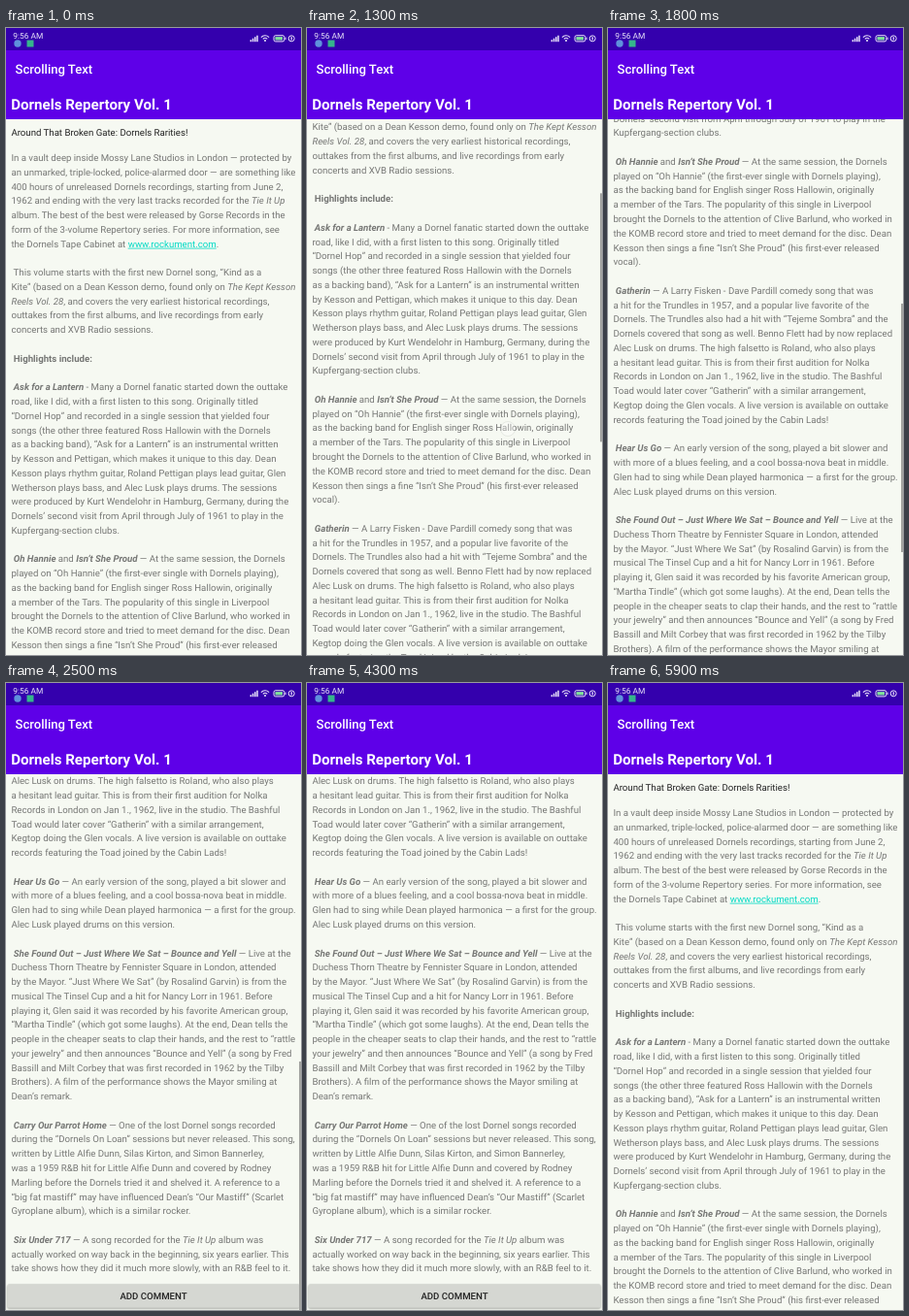
Recreate the animation shown at these times as an HTML page with a canvas. Size 304 px wide and 646 px high, loop 9 s.

```html
<!DOCTYPE html>
<html lang="en">
<head>
<meta charset="utf-8">
<title>Scrolling Text</title>
<style>
html, body { margin: 0; width: 100%; height: 100%; overflow: hidden; background: #f6f9f2; }
canvas { display: block; width: 304px; height: 646px; }
</style>
</head>
<body>
<canvas id="stage"></canvas>
<script>
const W = 304, H = 646, LOOP = 9000, STEP = 100;
const TOP = 94, MAX_SCROLL = 638, LEFT = 5.4;
const LINE = 14.765, FIRST = 137, SIZE = 9.64;
const FAMILY = 'Roboto, sans-serif';
const PAPER = '#f6f9f2', GREY = '#767775', INK = '#222', TEAL = '#03dac5';

// Marks: *bold italic*  _italic_  #bold#  ~link~
const article = `In a vault deep inside Mossy Lane Studios in London — protected by
an unmarked, triple-locked, police-alarmed door — are something like
400 hours of unreleased Dornels recordings, starting from June 2,
1962 and ending with the very last tracks recorded for the _Tie It Up_
album. The best of the best were released by Gorse Records in the
form of the 3-volume Repertory series. For more information, see
the Dornels Tape Cabinet at ~www.rockument.com~.

 This volume starts with the first new Dornel song, “Kind as a
Kite” (based on a Dean Kesson demo, found only on _The Kept Kesson_
_Reels Vol. 28_, and covers the very earliest historical recordings,
outtakes from the first albums, and live recordings from early
concerts and XVB Radio sessions.

# Highlights include:#

 *Ask for a Lantern* - Many a Dornel fanatic started down the outtake
road, like I did, with a first listen to this song. Originally titled
“Dornel Hop” and recorded in a single session that yielded four
songs (the other three featured Ross Hallowin with the Dornels
as a backing band), “Ask for a Lantern” is an instrumental written
by Kesson and Pettigan, which makes it unique to this day. Dean
Kesson plays rhythm guitar, Roland Pettigan plays lead guitar, Glen
Wetherson plays bass, and Alec Lusk plays drums. The sessions
were produced by Kurt Wendelohr in Hamburg, Germany, during the
Dornels’ second visit from April through July of 1961 to play in the
Kupfergang-section clubs.

 *Oh Hannie* and *Isn’t She Proud* — At the same session, the Dornels
played on “Oh Hannie” (the first-ever single with Dornels playing),
as the backing band for English singer Ross Hallowin, originally
a member of the Tars. The popularity of this single in Liverpool
brought the Dornels to the attention of Clive Barlund, who worked in
the KOMB record store and tried to meet demand for the disc. Dean
Kesson then sings a fine “Isn’t She Proud” (his first-ever released
vocal).

 *Gatherin* — A Larry Fisken - Dave Pardill comedy song that was
a hit for the Trundles in 1957, and a popular live favorite of the
Dornels. The Trundles also had a hit with “Tejeme Sombra” and the
Dornels covered that song as well. Benno Flett had by now replaced
Alec Lusk on drums. The high falsetto is Roland, who also plays
a hesitant lead guitar. This is from their first audition for Nolka
Records in London on Jan 1., 1962, live in the studio. The Bashful
Toad would later cover “Gatherin” with a similar arrangement,
Kegtop doing the Glen vocals. A live version is available on outtake
records featuring the Toad joined by the Cabin Lads!

 *Hear Us Go* — An early version of the song, played a bit slower and
with more of a blues feeling, and a cool bossa-nova beat in middle.
Glen had to sing while Dean played harmonica — a first for the group.
Alec Lusk played drums on this version.

 *She Found Out – Just Where We Sat – Bounce and Yell* — Live at the
Duchess Thorn Theatre by Fennister Square in London, attended
by the Mayor. “Just Where We Sat” (by Rosalind Garvin) is from the
musical The Tinsel Cup and a hit for Nancy Lorr in 1961. Before
playing it, Glen said it was recorded by his favorite American group,
“Martha Tindle” (which got some laughs). At the end, Dean tells the
people in the cheaper seats to clap their hands, and the rest to “rattle
your jewelry” and then announces “Bounce and Yell” (a song by Fred
Bassill and Milt Corbey that was first recorded in 1962 by the Tilby
Brothers). A film of the performance shows the Mayor smiling at
Dean’s remark.

 *Carry Our Parrot Home* — One of the lost Dornel songs recorded
during the “Dornels On Loan” sessions but never released. This song,
written by Little Alfie Dunn, Silas Kirton, and Simon Bannerley,
was a 1959 R&B hit for Little Alfie Dunn and covered by Rodney
Marling before the Dornels tried it and shelved it. A reference to a
“big fat mastiff” may have influenced Dean’s “Our Mastiff” (Scarlet
Gyroplane album), which is a similar rocker.

 *Six Under 717* — A song recorded for the _Tie It Up_ album was
actually worked on way back in the beginning, six years earlier. This
take shows how they did it much more slowly, with an R&B feel to it.`.split('\n');

const fonts = { '*': 'italic 700', '_': 'italic 400', '#': '700', '~': '400', '': '400' };

// Keyframes as [time, value] pairs
const scrollKeys = [[1000, 0], [1100, 22], [1200, 92], [1300, 164.5], [1500, 255],
  [1800, 409.5], [2000, 560], [2100, 616], [2200, 634], [2300, MAX_SCROLL],
  [4400, MAX_SCROLL], [4500, 618], [4700, 500], [5000, 259.5], [5200, 105],
  [5300, 45], [5400, 12], [5500, 0]];
const barKeys = [[1000, 0], [1100, 1], [2500, 1], [2800, 0],
  [4400, 0], [4500, 1], [5600, 1], [5900, 0]];
const rippleSize = [[3200, 0], [3800, 1]];
const rippleFade = [[3200, 0], [3400, 1], [3900, 1], [4300, 0]];
const touches = [
  { from: 800, to: 1400, x: [[900, 214.5], [1300, 207]], y: [[800, 489], [900, 470], [1000, 470], [1300, 413]] },
  { from: 3300, to: 4100, x: [[0, 152]], y: [[0, 632]] },
  { from: 4500, to: 5500, x: [[4500, 176], [5000, 170]], y: [[4500, 209], [4700, 327], [5000, 567], [5100, 583]] }
];

const canvas = document.getElementById('stage');
const ctx = canvas.getContext('2d');
const ratio = window.devicePixelRatio || 1;
canvas.width = W * ratio;
canvas.height = H * ratio;
ctx.scale(ratio, ratio);
ctx.textRendering = 'geometricPrecision';

function at(keys, t) {
  if (t <= keys[0][0]) return keys[0][1];
  for (let i = 1; i < keys.length; i++) {
    const [t0, a] = keys[i - 1], [t1, b] = keys[i];
    if (t <= t1) return a + (b - a) * (t - t0) / (t1 - t0);
  }
  return keys[keys.length - 1][1];
}

function rect(x, y, w, h, color) {
  ctx.fillStyle = color;
  ctx.fillRect(x, y, w, h);
}

function round(x, y, w, h, r) {
  ctx.beginPath();
  ctx.roundRect(x, y, w, h, r);
}

function disc(x, y, r, color) {
  ctx.beginPath();
  ctx.arc(x, y, r, 0, Math.PI * 2);
  ctx.fillStyle = color;
  ctx.fill();
}

function text(str, x, y, weight, size, color) {
  ctx.font = `${weight} ${size}px ${FAMILY}`;
  ctx.fillStyle = color;
  ctx.fillText(str, x, y);
  return ctx.measureText(str).width;
}

function richLine(line, y) {
  let x = LEFT, mark = '';
  for (const part of line.split(/([*_#~])/)) {
    if (part && '*_#~'.includes(part)) {
      mark = mark === part ? '' : part;
    } else if (part) {
      const link = mark === '~';
      const w = text(part, x, y, fonts[mark], SIZE, link ? TEAL : GREY);
      if (link) rect(x, y + 1.1, w, 0.8, TEAL);
      x += w;
    }
  }
}

function drawButton(y, t) {
  ctx.save();
  ctx.shadowColor = 'rgba(0,0,0,.35)';
  ctx.shadowBlur = 2 * ratio;
  ctx.shadowOffsetY = ratio;
  round(1.5, y, 301, 24.5, 1.6);
  ctx.fillStyle = '#d5d7d2';
  ctx.fill();
  ctx.restore();

  const fade = at(rippleFade, t);
  if (fade > 0) {
    ctx.save();
    round(1.5, y, 301, 24.5, 1.6);
    ctx.clip();
    rect(1, y, 302, 25, `rgba(0,0,0,${0.05 * fade})`);
    disc(152, y + 12, 155 * at(rippleSize, t), `rgba(0,0,0,${0.08 * fade})`);
    ctx.restore();
  }
  ctx.textAlign = 'center';
  text('ADD COMMENT', 152, y + 15.6, 500, 9.65, INK);
  ctx.textAlign = 'left';
}

function drawContent(t) {
  const scroll = at(scrollKeys, t);
  text('Around That Broken Gate: Dornels Rarities!', LEFT, 110.8 - scroll, 400, SIZE, INK);
  article.forEach((line, i) => {
    const y = FIRST + i * LINE - scroll;
    if (y > TOP - 5 && y < H + 12) richLine(line, y);
  });
  drawButton(619.3 + MAX_SCROLL - scroll, t);

  const view = H - TOP, scale = view / (view + MAX_SCROLL);
  ctx.globalAlpha = at(barKeys, t);
  rect(302, TOP + scroll * scale, 2, view * scale, '#a3a4a1');
  ctx.globalAlpha = 1;
}

function drawTouch(t) {
  for (const { from, to, x, y } of touches) {
    if (t < from || t >= to) continue;
    disc(at(x, t), at(y, t), 7.5, 'rgba(255,255,255,.3)');
    ctx.strokeStyle = 'rgba(120,125,120,.14)';
    ctx.lineWidth = 1;
    ctx.stroke();
  }
}

function drawStatus() {
  const light = '#e9e4fa';
  text('9:56 AM', 7.2, 10.8, 400, 8.4, light);
  disc(12, 16, 3.7, '#5f92dc');
  rect(21.5, 12.5, 7, 7, '#35b58c');

  for (let i = 0; i < 4; i++) rect(251.6 + i * 2.2, 12.2 - i * 1.5, 1.5, 2 + i * 1.5, light);

  ctx.strokeStyle = light;
  ctx.lineWidth = 1.1;
  for (const r of [3, 5.6]) {
    ctx.beginPath();
    ctx.arc(267, 13.4, r, -Math.PI * 0.76, -Math.PI * 0.24);
    ctx.stroke();
  }
  disc(267, 13, 1, light);

  ctx.lineWidth = 1;
  round(276, 7.7, 10.8, 6.2, 1.8);
  ctx.stroke();
  rect(277.4, 9.1, 7.6, 3.4, '#7fe09a');
  rect(287.5, 9.6, 1, 2.4, light);

  ctx.beginPath();
  ctx.arc(294.2, 10.8, 3, 0, Math.PI * 2);
  ctx.stroke();
  rect(293.6, 9.2, 1.2, 3.2, light);
}

function drawHeader() {
  rect(0, 0, W, 23, '#3400ad');
  rect(0, 23, W, TOP - 23, '#5e00e8');
  drawStatus();
  text('Scrolling Text', 9.6, 47, 500, 13.1, '#fff');
  text('Dornels Repertory Vol. 1', 5.2, 83.6, 700, 15.1, '#fff');
}

const start = performance.now();

function frame() {
  const now = (performance.now() - start) % LOOP;
  const t = Math.floor(now / STEP) * STEP;
  rect(0, 0, W, H, PAPER);
  drawContent(t);
  drawTouch(t);
  drawHeader();
  requestAnimationFrame(frame);
}
frame();
</script>
</body>
</html>
```
